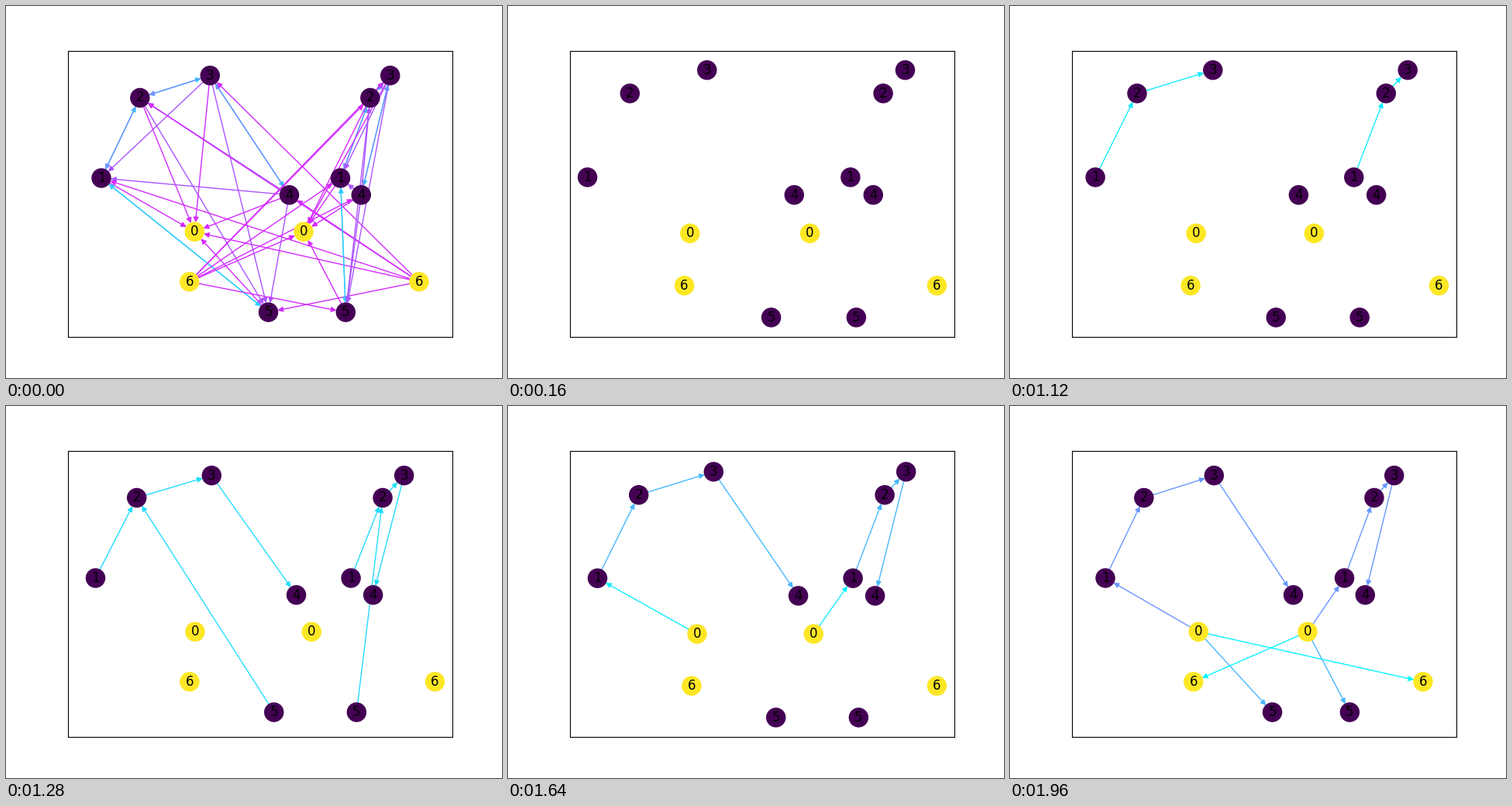
Write a matplotlib script that moves like this. It is 640x480 px and loops after 2.04 s.

```python
import numpy as np
import matplotlib.pyplot as plt
from matplotlib.animation import FuncAnimation
from matplotlib.patches import FancyArrowPatch

FRAMES, STEP_MS = 51, 40
HOLD = 49           # the last pose is held from here
CLEAR = 4           # the full net has emptied by then
CHAIN, SWAP = 23, 40  # the chain starts; node 0 takes over from node 5
PAD, MARGIN = 0.05, 0.05
NODE_SIZE = 300

# Key points, one row per node: x in the left graph, x in the right, shared y
nodes = np.array([
    (234.8, 389.6, 293.4), (102.55, 441.9, 221), (157.3, 484.1, 112.8),
    (256.8, 512.5, 82.7), (369.3, 471.3, 243.8), (339.6, 449.4, 401.9),
    (553.45, 227.6, 360.8)])
graphs = [nodes[:, [0, 2]], nodes[:, [1, 2]]]
BASE_X = nodes[:, 0].min(), nodes[:, 0].max()
BASE_Y = 74.4, 410.4


def targets(a):
    """Nodes reached by a: all lower ones, the next one and node 5."""
    lower = range(2 if a == 5 else a)
    return sorted({*lower, a + 1, 5} - {a, 6, 7})


def full_strength(a, b):
    if b == 0 or a == 6:
        return .83
    if {a, b} == {1, 5} or b == a + 1 < 5:
        return .2
    return .43 if b == a - 1 else .67


full_net = {(a, b): full_strength(a, b)
            for a in range(1, 7) for b in targets(a)}


def growing_net(frame):
    """Chain 1-2-3-4 first, then links from node 5, then from node 0."""
    age = .0155 * (frame - CHAIN)
    net = {(k, k + 1): age for k in (1, 2, 3)
           if frame >= CHAIN + 3 * (k - 1)}
    if CHAIN + 8 <= frame < SWAP:
        net[5, 2] = age
    for b, start, rate in ((1, SWAP, .07), (6, 45, .01), (5, 47, .14)):
        if frame >= start:
            net[0, b] = min(.42, rate * (frame - start))
    return net


def links_at(frame):
    if frame < CLEAR:
        limit = 1 - frame / CLEAR
        return {e: s for e, s in full_net.items() if s <= limit}
    return growing_net(min(frame, HOLD))


def padded(values):
    lo, hi = np.min(values), np.max(values)
    pad = PAD * (hi - lo)
    return lo - pad, hi + pad


def view(links, axis, base):
    """Axis range holding all nodes and the padded extent of each graph."""
    lo, hi = base
    used = [n for edge in links for n in edge]
    if used:
        for pos in graphs:
            a, b = padded(pos[used, axis])
            lo, hi = min(lo, a), max(hi, b)
    extra = MARGIN * (hi - lo)
    return lo - extra, hi + extra


fig, ax = plt.subplots(figsize=(6.4, 4.8), dpi=100)
ax.set(xticks=[], yticks=[])
cool, viridis = plt.get_cmap("cool"), plt.get_cmap("viridis")
node_colors = [viridis(1.0 if n in (0, 6) else 0.0) for n in range(7)]

for pos in graphs:
    ax.scatter(*pos.T, s=NODE_SIZE, c=node_colors, zorder=2)
    for n, (x, y) in enumerate(pos):
        ax.text(x, y, str(n), size=12, family="DejaVu Sans", color="black",
                ha="center", va="center", zorder=3)

arrows = []
radius = np.sqrt(NODE_SIZE) / 2


def draw(frame):
    while arrows:
        arrows.pop().remove()
    links = links_at(frame)
    ax.set_xlim(view(links, 0, BASE_X))
    ax.set_ylim(view(links, 1, BASE_Y)[::-1])
    for pos in graphs:
        for (a, b), strength in links.items():
            arrow = FancyArrowPatch(
                pos[a], pos[b], arrowstyle="-|>", mutation_scale=10,
                shrinkA=radius, shrinkB=radius, lw=1,
                color=cool(float(strength)), zorder=1)
            arrows.append(ax.add_patch(arrow))
    return arrows


anim = FuncAnimation(fig, draw, frames=FRAMES, interval=STEP_MS,
                     init_func=lambda: [], repeat=True, repeat_delay=0)
plt.show()
```
